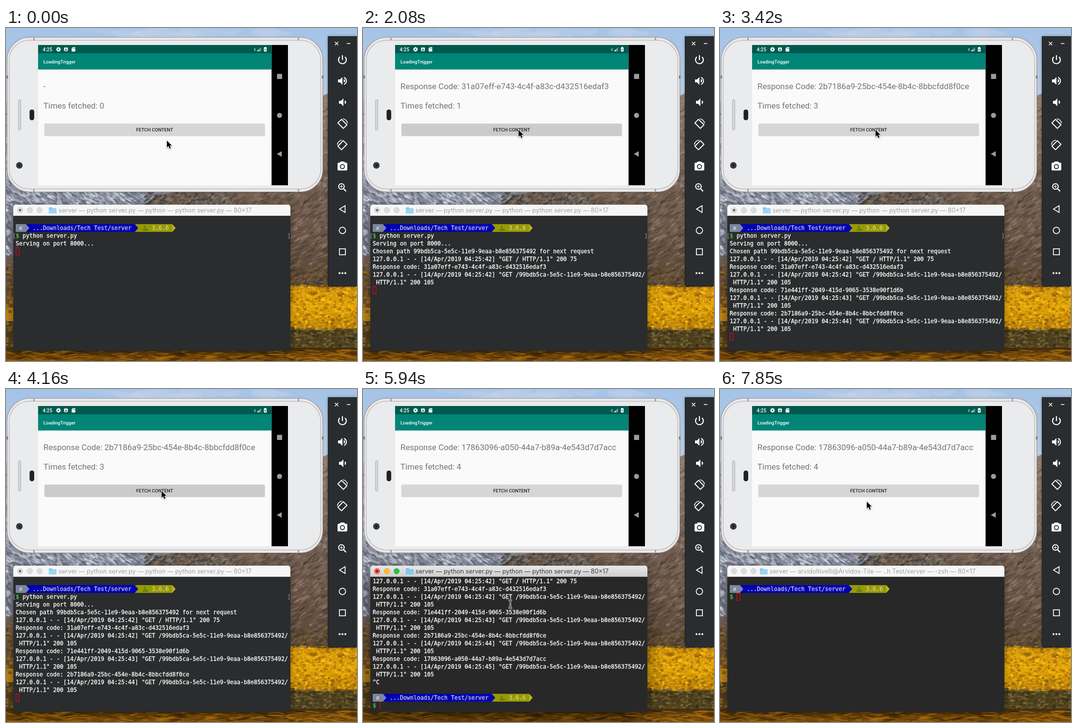
These frames come from a looping animation (722 px wide and 686 px high, 8000 ms). An HTML page with a canvas:

```html
<!DOCTYPE html>
<html lang="en">
<head>
<meta charset="utf-8">
<title>Fetch demo</title>
<style>
html, body { margin: 0; width: 100%; height: 100%; overflow: hidden; background: #a9c5e4; }
canvas { display: block; width: 722px; height: 686px; }
</style>
</head>
<body>
<canvas id="stage" width="722" height="686"></canvas>
<script>
const W = 722, H = 686, LOOP = 8000;
const stage = document.getElementById('stage').getContext('2d');
const MONO = '11.63px "DejaVu Sans Mono", monospace';
const ROBOTO = 'Roboto, sans-serif';
let c = stage;

// ---------- helpers ----------
function box(x, y, w, h, fill) { c.fillStyle = fill; c.fillRect(x, y, w, h); }
function round(x, y, w, h, r, fill, line, lw = 1) {
  c.beginPath(); c.roundRect(x, y, w, h, r);
  if (fill) { c.fillStyle = fill; c.fill(); }
  if (line) { c.strokeStyle = line; c.lineWidth = lw; c.stroke(); }
}
function disc(x, y, r, fill, line, lw = 1) {
  c.beginPath(); c.arc(x, y, r, 0, 7);
  if (fill) { c.fillStyle = fill; c.fill(); }
  if (line) { c.strokeStyle = line; c.lineWidth = lw; c.stroke(); }
}
function trace(pts) {
  c.beginPath();
  for (let i = 0; i < pts.length; i += 2) c.lineTo(pts[i], pts[i + 1]);
}
function poly(pts, fill) { trace(pts); c.closePath(); c.fillStyle = fill; c.fill(); }
function line(pts, color, lw = 1) { trace(pts); c.strokeStyle = color; c.lineWidth = lw; c.stroke(); }
function ramp(y0, y1, ...colors) {
  const g = c.createLinearGradient(0, y0, 0, y1);
  colors.forEach((k, i) => g.addColorStop(i / (colors.length - 1), k));
  return g;
}
function text(s, x, y, font, color, align = 'left') {
  c.font = font; c.textAlign = align; c.fillStyle = color; c.fillText(s, x, y);
}
function mono(s, x, y, color) {
  text(s, x, y, MONO, color);
  c.strokeStyle = color; c.lineWidth = 0.3; c.strokeText(s, x, y);
}
function at(x, y, draw) { c.save(); c.translate(x, y); draw(); c.restore(); }

let seed = 7;
function rnd() { seed = (seed * 16807) % 2147483647; return seed / 2147483647; }
// soft strokes of rx by ry, leaning by tilt
function dabs(n, x, y, w, h, rx, ry, tilt, colors) {
  for (let i = 0; i < n; i++) {
    c.globalAlpha = 0.25 + rnd() * 0.45;
    c.fillStyle = colors[Math.floor(rnd() * colors.length)];
    c.beginPath();
    c.ellipse(x + rnd() * w, y + rnd() * h, rx * (0.5 + rnd()), ry * (0.5 + rnd()), tilt + rnd() * 0.5 - 0.25, 0, 7);
    c.fill();
  }
  c.globalAlpha = 1;
}

// ---------- still scenery ----------
function wallpaper() {
  box(0, 0, W, H, ramp(0, 220, '#a4c3e6', '#b6cce6', '#cdd6e2'));
  dabs(24, 120, 4, 460, 14, 30, 7, 0, ['#c3d3e7', '#b7cce7']);

  poly([0, 150, 30, 180, 180, 300, 400, 330, 400, 500, 0, 500], ramp(160, 500, '#aeb2bd', '#8f95a3', '#676570'));
  dabs(150, 0, 170, 10, 320, 4, 2, 0.8, ['#e6e9f0', '#6b7284', '#b6bcc9', '#565a6a']);
  dabs(420, 0, 335, 300, 32, 6, 1.8, 0.6, ['#e6e9f0', '#6b7284', '#c3c8d3', '#565a6a']);

  poly([270, 370, 330, 340, 470, 322, 610, 190, 650, 140, 722, 110, 722, 560, 585, 560, 270, 400],
    ramp(140, 560, '#8f8075', '#7a695d', '#6b5647', '#57442f'));
  dabs(360, 585, 330, 80, 200, 7, 1.8, -0.6, ['#96806f', '#463a34', '#836a59', '#5a4a40']);
  dabs(120, 640, 150, 24, 190, 6, 1.8, -0.6, ['#a3917f', '#5c4d45', '#836f60']);
  dabs(260, 285, 340, 190, 26, 4, 2, -0.5, ['#40403c', '#2f322f', '#7f7467', '#8e8988']);
  dabs(170, 470, 338, 120, 26, 7, 2, -0.4, ['#8b7768', '#4f443d', '#75614f']);
  dabs(90, 585, 496, 80, 38, 5, 2, 0, ['#3f3424', '#5d482b', '#7a5f2c']);

  box(0, 470, 15, 108, ramp(470, 578, '#6c605c', '#644b36', '#6c4a1c'));
  box(0, 576, 15, 30, '#bd850f');
  box(0, 604, 15, 56, ramp(604, 660, '#43351a', '#54401d'));
  dabs(110, 0, 480, 15, 178, 4, 2, 0, ['#8c6a2c', '#43331f', '#a97a1c']);

  box(585, 534, 137, 92, ramp(534, 626, '#cf940e', '#e3a507', '#a56f0b'));
  dabs(900, 583, 530, 142, 92, 3, 2, 0, ['#f6bd0b', '#ffc91f', '#ad6f08', '#de9a05', '#7d520e']);
  box(585, 622, 137, 40, '#51431f');
  dabs(330, 583, 618, 142, 42, 3.5, 2, 0, ['#332c17', '#75612e', '#8a7440', '#453a20']);
  box(0, 659, W, 27, ramp(659, 686, '#3d290e', '#71470b', '#7f500a'));
  dabs(330, 0, 664, W, 22, 12, 1.3, 0, ['#b3700c', '#4a2d08', '#c68311', '#33210a']);
}

function phone() {
  c.save();
  c.shadowColor = 'rgba(0,0,0,.25)'; c.shadowBlur = 4; c.shadowOffsetY = 1;
  round(2.5, 19.5, 649, 318, 46, '#e6e2e3');
  c.restore();
  round(2.5, 19.5, 649, 318, 46, null, '#aaa1a2', 1.2);
  round(4.5, 22, 645, 313, 44, null, '#f1efef', 1.6);
  round(6.5, 25.5, 641, 306, 41, '#e9ebec', '#b9b1b2', 1.2);
  for (const x of [56, 600]) { box(x, 19, 3, 7, '#a8a4a5'); box(x, 331, 3, 7, '#a8a4a5'); }
  for (const x of [1, 650]) box(x, 98, 3, 6, '#777173');
  round(25.5, 147.5, 5, 63, 2.5, '#d3d7da', '#b0b4b8');
  round(48.5, 168, 9.5, 22, 4.5, '#202123');
  disc(27.5, 283, 6.7, '#303335');
  disc(27.5, 283, 3.5, '#17191a', '#5b5f62');

  box(66, 35, 480, 289, '#fafafa');
  box(546.3, 35, 33.7, 289, '#000');
  box(66, 52, 480, 33.5, '#008577');
  box(66, 35, 480, 17, '#00594d');
  text('4:25', 75.5, 47.5, '500 10px ' + ROBOTO, '#fff');
  text('LoadingTrigger', 77, 73, '500 9.7px ' + ROBOTO, '#fff');
  at(108, 44, () => {
    for (let i = 0; i < 4; i++) { c.rotate(Math.PI / 4); box(-1.1, -4.7, 2.2, 9.4, '#fff'); }
    disc(0, 0, 2.7, null, '#fff', 1.8);
    disc(0, 0, 1.5, '#00594d');
  });
  round(119.5, 40.2, 7.6, 7.6, 1, '#fff');
  text('A', 123.3, 46.8, '700 7px ' + ROBOTO, '#00594d', 'center');
  poly([137.5, 39.5, 142.5, 39.5, 142.5, 48.5, 135, 48.5, 135, 42], '#fff');
  for (const x of [137.5, 139.3, 141]) box(x, 41, 0.8, 2, '#00594d');
  text('E', 510, 47, '8px ' + ROBOTO, '#e4efed');
  poly([516, 48, 524.5, 39.5, 524.5, 48], '#6f9f97');
  poly([516, 48, 520, 44, 520, 48], '#e4efed');
  round(530.5, 40, 5.6, 8.6, 0.8, '#fff');
  box(532, 39, 2.6, 1, '#fff');
  poly([533.8, 41.5, 531.7, 45, 533, 45, 532.8, 47.3, 534.9, 43.9, 533.6, 43.9], '#00594d');

  round(557.5, 94.5, 10.5, 10.5, 0.5, '#9b9b9b');
  disc(562.6, 180, 5.2, '#9b9b9b');
  poly([557, 259.5, 567.2, 253.8, 567.2, 265.2], '#9b9b9b');
}

function speaker(waves) {
  poly([-9, -3, -5, -3, 0, -8, 0, 8, -5, 3, -9, 3], '#fff');
  c.beginPath(); c.arc(1.5, 0, 4, -1.25, 1.25); c.fillStyle = '#fff'; c.fill();
  if (waves) {
    c.beginPath(); c.arc(0.5, 0, 7.8, -1.2, 1.2);
    c.strokeStyle = '#fff'; c.lineWidth = 2; c.stroke();
  }
}
function turned(flip) {
  c.scale(flip, 1);
  c.save();
  c.rotate(Math.PI / 4);
  c.lineJoin = 'round';
  c.strokeStyle = '#fff'; c.lineWidth = 2;
  c.strokeRect(-8, -5.3, 16, 10.6);
  c.restore();
  c.beginPath(); c.arc(0, 0, 10.5, -1.5, -0.1);
  c.lineWidth = 1.6; c.stroke();
}
function sidebar() {
  c.save();
  c.shadowColor = 'rgba(0,0,0,.35)'; c.shadowBlur = 5;
  box(662, 17, 60, 515, '#1b1e1f');
  c.restore();
  box(663, 18, 59, 513, '#2a2d2f');
  const w = '#fff';
  line([676.5, 28.5, 683.5, 35.5], w, 1.4); line([683.5, 28.5, 676.5, 35.5], w, 1.4);
  line([701, 32, 708.5, 32], w, 1.5);
  at(692, 65, () => {
    c.beginPath(); c.arc(0, 0.5, 8, -0.85, Math.PI + 0.85);
    c.strokeStyle = w; c.lineWidth = 2.2; c.stroke();
    line([0, -9, 0, 1], w, 2.2);
  });
  at(692, 109, () => speaker(true));
  at(694, 153, () => speaker(false));
  at(692, 197.5, () => turned(1));
  at(692, 241.5, () => turned(-1));
  round(682, 277.5, 20, 16, 2, w);
  poly([686, 278, 688.5, 275, 695.5, 275, 698, 278], w);
  disc(692, 285.5, 4.2, w, '#2a2d2f', 1.9);
  disc(690, 326.5, 5.8, null, w, 2);
  line([694.3, 331, 699.5, 336.3], w, 2.4);
  line([687, 326.5, 693, 326.5], w, 1.3); line([690, 323.5, 690, 329.5], w, 1.3);
  trace([686, 373, 697.5, 366, 697.5, 380]); c.closePath();
  c.strokeStyle = w; c.lineWidth = 1.7; c.stroke();
  disc(692, 417, 6.6, null, w, 1.7);
  c.strokeRect(685.8, 454.8, 12.4, 12.4);
  for (const x of [686, 692, 698]) disc(x, 505, 2, w);
}

const still = document.createElement('canvas');
still.width = W; still.height = H;
c = still.getContext('2d');
wallpaper(); phone(); sidebar();
c = stage;

// ---------- story ----------
const CODES = [
  '31a07eff-e743-4c4f-a83c-d432516edaf3', '71e441ff-2049-415d-9065-3538e90f1d6b',
  '2b7186a9-25bc-454e-8b4c-8bbcfdd8f0ce', '17863096-a050-44a7-b89a-4e543d7d7acc'];
const PATH = '99bdb5ca-5e5c-11e9-9eaa-b8e856375492';
const PRESS = [730, 2080, 3120, 4020];
const STEP = 145, FOCUS = 4900, BREAK = 5790, SHELL = 5940, RETITLE = 6090, CLEAR = 6680, BLUR = 7710;
const BAR = {};

// time, tip x, tip y
const POINTER = [
  [0, 331, 232], [140, 328, 226], [290, 322, 214], [440, 320, 210],
  [4320, 319, 216], [4460, 312, 268], [4610, 304, 372], [4760, 303, 443],
  [6980, 303, 432], [7130, 304, 372], [7280, 304, 300], [7420, 302, 250], [7570, 302, 232]];

function log(t, fetched) {
  if (t >= CLEAR) return ['', BAR, '$ '];
  const out = ['', BAR, '$ python server.py', 'Serving on port 8000...'];
  const hit = (s, req) => `127.0.0.1 - - [14/Apr/2019 04:25:${s}] "GET /${req}`;
  for (let i = 0; i < fetched; i++) {
    if (!i) out.push(`Chosen path ${PATH} for next request`, hit(42, ' HTTP/1.1" 200 75'));
    // the first two requests share a second
    out.push('Response code: ' + CODES[i], hit(42 + i, PATH + '/'), ' HTTP/1.1" 200 105');
  }
  out.push(t >= BREAK ? '^C' : '');
  if (t >= SHELL) out.push('', BAR, '$ ');
  return out;
}

function app(t, fetched) {
  const say = (s, y) => text(s, 77, y, '16.85px ' + ROBOTO, '#757575');
  say(fetched ? 'Response Code: ' + CODES[fetched - 1] : '-', 126);
  say('Times fetched: ' + fetched, 165.5);

  const pressed = PRESS.some(p => t >= p && t < p + 2 * STEP);
  c.save();
  c.shadowColor = 'rgba(0,0,0,.2)'; c.shadowBlur = 1.5; c.shadowOffsetY = 0.5;
  round(79.3, 197, 453, 25, 1.5, pressed ? '#cbcbcb' : '#d6d6d6');
  c.restore();
  text('FETCH CONTENT', 305.7, 213.2, '500 9.7px ' + ROBOTO, '#222', 'center');
}

function promptBar(y) {
  const tip = (x, fill) => poly([x, y, x + 7, y + 8, x, y + 16], fill);
  box(20, y, 21, 16, '#7b869d');
  box(41, y, 224, 16, '#0000b4');
  box(265, y, 77, 16, '#999a00');
  tip(41, '#7b869d'); tip(265, '#0000b4'); tip(342, '#b5b62a');
  mono('✘', 27, y + 12, '#c9cbd0');
  mono('...Downloads/Tech Test/server', 55, y + 12, '#c9cbdd');
  mono('3.6.6', 300, y + 12, '#d0d0a4');
  c.lineCap = 'round';
  line([281, y + 12, 285, y + 13, 291, y + 12, 287, y + 10, 284, y + 8, 286, y + 4], '#4b7a25', 2);
  c.lineCap = 'butt';
}

function terminal(t, lines) {
  const focus = t >= FOCUS && t < BLUR, shell = t >= RETITLE;
  c.save();
  c.shadowColor = focus ? 'rgba(0,0,0,.55)' : 'rgba(0,0,0,.4)';
  c.shadowBlur = focus ? 36 : 15;
  c.shadowOffsetY = focus ? 15 : 6;
  round(15, 364, 570, 301, 5, t >= FOCUS ? '#282828' : '#2a2c2d');
  c.restore();
  round(15, 364, 570, 22.5, [5, 5, 0, 0], focus ? ramp(364, 386, '#e9e8e9', '#d0cfd0') : '#f6f6f6');
  box(15, 386, 570, 1, focus ? '#aeadae' : '#d2d2d2');

  const lights = focus ? ['#fc5b54', '#fdbc2f', '#2ac53c'] : ['#dcdcdc', '#dcdcdc', '#dcdcdc'];
  const rims = focus ? ['#e0443e', '#dea123', '#1aab29'] : ['#cbcbcb', '#cbcbcb', '#cbcbcb'];
  lights.forEach((k, i) => disc(29 + 20 * i, 375.3, 5.6, k, rims[i], 0.9));
  if (!shell) disc(29, 375.3, 2.2, focus ? '#7d110c' : '#555');

  const x = shell ? 82 : 88;
  c.globalAlpha = focus ? 1 : 0.75;
  round(x, 369.5, 7, 4, 1, '#5fb9e6');
  round(x, 371, 16, 11, 1, '#7dcbf2');
  c.globalAlpha = 1;
  const title = shell
    ? 'server — arvidoltivelli@Arvidos-Tile — ..h Test/server — -zsh — 80×17'
    : 'server — python server.py — python — python server.py — 80×17';
  text(title, x + 20, 380, '12.7px Inter, sans-serif', focus ? '#3b3b3b' : '#a2a2a2');

  const top = Math.max(0, lines.length - 17);
  lines.slice(top).forEach((s, i) => {
    const y = 388 + 16 * i;
    if (s === BAR) return promptBar(y);
    if (s[0] !== '$') return mono(s, 20, y + 12, '#fff');
    mono('$', 20, y + 12, '#4bd336');
    mono(s.slice(2), 34, y + 12, '#fff');
    if (s.length > 2) {
      line([18.5, y + 3.5, 16.5, y + 3.5, 16.5, y + 13.5, 18.5, y + 13.5], '#a3a3a3');
      line([580.5, y + 3.5, 582.5, y + 3.5, 582.5, y + 13.5, 580.5, y + 13.5], '#a3a3a3');
    }
  });
  const cx = 20 + 7 * lines[lines.length - 1].length, cy = 388 + 16 * (lines.length - 1 - top);
  if (focus) box(cx, cy, 1.3, 16, '#f4001d');
  else {
    c.strokeStyle = '#f4001d'; c.lineWidth = 1.2;
    c.strokeRect(cx + 0.6, cy + 0.6, 6.2, 14.8);
  }
}

function pointer(t) {
  const [, x, y] = POINTER.filter(p => p[0] <= t).pop();
  at(x, y, () => {
    c.lineJoin = 'round';
    if (y > 387) {
      const beam = (color, lw) => {
        line([-4, -8, -1.5, -8, 0, -6.5, 1.5, -8, 4, -8], color, lw);
        line([-4, 8, -1.5, 8, 0, 6.5, 1.5, 8, 4, 8], color, lw);
        line([0, -7, 0, 7], color, lw);
        line([-2.5, 3, 2.5, 3], color, lw);
      };
      beam('#e8e8e8', 3); beam('#202020', 1.1);
      return;
    }
    c.save();
    c.shadowColor = 'rgba(0,0,0,.4)'; c.shadowBlur = 3; c.shadowOffsetY = 1;
    trace([0, 0, 0, 14, 3.2, 11, 5.5, 16.2, 8, 15.2, 5.7, 10.2, 10, 10]);
    c.closePath();
    c.strokeStyle = '#fff'; c.lineWidth = 1.8; c.stroke();
    c.restore();
    c.fillStyle = '#000'; c.fill();
  });
}

function frame() {
  const t = performance.now() % LOOP;
  const fetched = PRESS.filter(p => t >= p + STEP).length;
  c.drawImage(still, 0, 0);
  app(t, fetched);
  terminal(t, log(t, fetched));
  pointer(t);
  requestAnimationFrame(frame);
}
frame();
</script>
</body>
</html>
```
